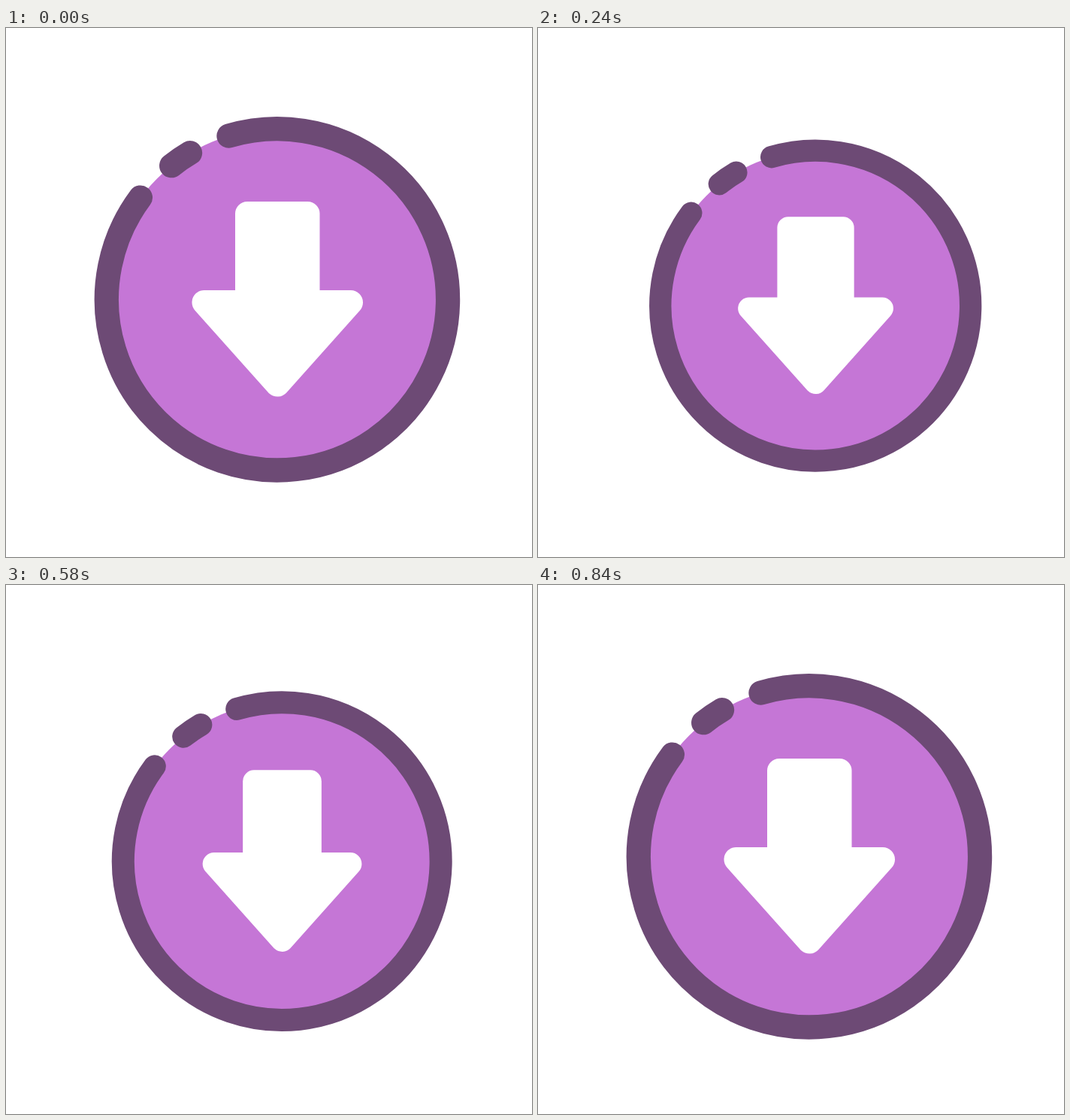
Write an HTML page that moves like this. It is 700 px wide and 704 px high and loops after 2.98 s.

```html
<!DOCTYPE html>
<html lang="en">
<head>
<meta charset="utf-8">
<title>Download button</title>
<style>
  html, body { margin: 0; width: 100%; height: 100%; overflow: hidden; background: #fff; }
  svg { display: block; width: 100%; height: 100%; }
</style>
</head>
<body>
<svg viewBox="0 0 700 704">
  <g id="button" stroke-linecap="round" stroke-linejoin="round">
    <circle cx="361.25" cy="361.25" r="227" fill="#c576d6"/>
    <g fill="none" stroke="#6d4a75" stroke-width="32.3">
      <path d="M296.5 143.6A227.1 227.1 0 1 1 178.9 225.6"/>
      <path d="M220.2 183.2A227.1 227.1 0 0 1 245 166.2"/>
    </g>
    <g fill="#fff">
      <rect x="305" y="231" width="112.5" height="160" rx="16"/>
      <path d="M263.7 365.2H458.8L361.25 474.4Z" stroke="#fff" stroke-width="32.4"/>
    </g>
  </g>
</svg>
<script>
  const LOOP = 2980, STEP = 20;
  const PRESSED = 360, RELEASED = 840;
  const DEPTH = 0.123, PIVOT = 452;
  const button = document.getElementById('button');
  const ease = u => u * u * (3 - 2 * u);

  function scaleAt(t) {
    if (t >= RELEASED) return 1;
    const press = t < PRESSED ? t / PRESSED : (RELEASED - t) / (RELEASED - PRESSED);
    return 1 - DEPTH * ease(press);
  }

  const start = performance.now();
  function draw() {
    const t = (performance.now() - start) % LOOP;
    const s = scaleAt(Math.floor(t / STEP) * STEP);
    const shift = PIVOT * (1 - s);
    button.setAttribute('transform', `translate(${shift} ${shift}) scale(${s})`);
    requestAnimationFrame(draw);
  }
  draw();
</script>
</body>
</html>
```
